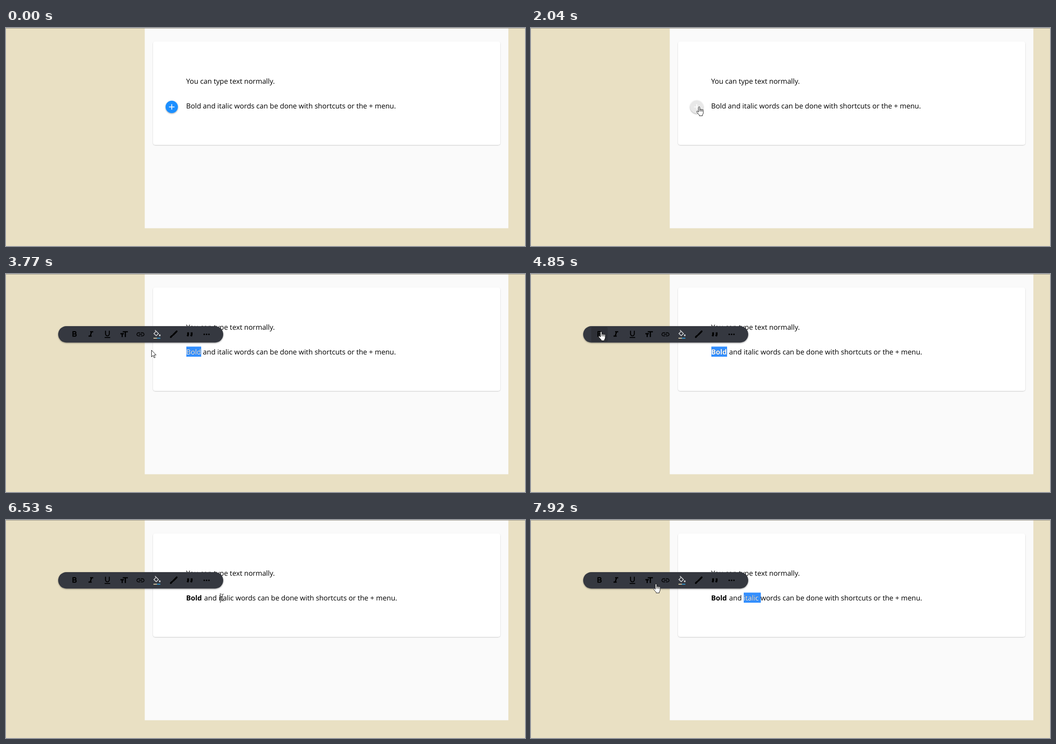
Recreate the animation shown at these times as an HTML page. Size 1154 px wide and 485 px high, loop 8000 ms.

```html
<!DOCTYPE html>
<html lang="en">
<head>
<meta charset="utf-8">
<title>Text editor demo</title>
<style>
html, body { margin: 0; width: 100%; height: 100%; overflow: hidden; background: #e9e0c3; }
svg { display: block; width: 100%; height: 100%; }
text { font-family: "Open Sans", "Noto Sans", sans-serif; font-size: 15.71px; text-rendering: geometricPrecision; }
.pointer { fill: #fff; stroke: #111; stroke-width: 1; stroke-linejoin: round; }
</style>
</head>
<body>
<svg viewBox="0 0 1154 485">
  <defs>
    <filter id="cardShade" x="-5%" y="-5%" width="110%" height="115%">
      <feDropShadow dx="0" dy="1" stdDeviation="1" flood-opacity=".2"/>
    </filter>
    <filter id="shade" x="-30%" y="-30%" width="160%" height="170%">
      <feDropShadow dx="0" dy="1.2" stdDeviation="1.6" flood-opacity=".4"/>
    </filter>
    <clipPath id="picked"><rect id="clip" y="161.5" height="22.5"/></clipPath>
  </defs>

  <rect width="1154" height="485" fill="#e9e0c3"/>
  <rect x="308.5" width="808.5" height="445.5" fill="#fafafa"/>
  <rect width="1154" height="1" fill="#989284"/>
  <rect x="327" y="30" width="772" height="230" rx="5" fill="#fff" filter="url(#cardShade)"/>

  <text x="400.5" y="124">You can type text normally.</text>
  <rect id="mark" y="161.5" height="22.5" fill="#338fff"/>
  <g id="line">
    <text id="word" x="400.5" y="179">Bold</text>
    <text id="rest" y="179">and italic words can be done with shortcuts or the + menu.</text>
  </g>
  <use href="#line" fill="#fff" clip-path="url(#picked)"/>
  <rect id="caret" x="476" y="163" width="1" height="21"/>

  <g id="plus" transform="translate(368.5 175.5)">
    <circle id="disc" r="13.7" filter="url(#shade)"/>
    <path d="M-6.1 0H6.1M0-6.1V6.1" stroke="#fff" stroke-width="1.75"/>
  </g>

  <g id="bar">
    <rect x="116" y="116" width="367" height="36.5" rx="18.2" fill="#363940" filter="url(#shade)"/>
    <rect id="press" x="134" y="118" width="36.5" height="33" rx="3" opacity=".14"/>
    <g id="icons" fill="none" stroke="#000"></g>
  </g>

  <path id="arrow" class="pointer" d="M.5.5V15.4L4 12.1 6.4 17.5 8.7 16.5 6.3 11.2H10.8Z"/>
  <g id="hand"><g class="pointer" transform="translate(-5.2 -1.3)">
    <path d="M4.5 12.5V2a1.5 1.5 0 0 1 3 0V6.8a1.4 1.4 0 0 1 2.7.3 1.3 1.3 0 0 1 2.5.6 1.3 1.3 0 0 1 2.6 1V14q0 2.6-1.9 4.4V20.6H6.4V18.8Q4.4 17 1 12.6a1.4 1.4 0 0 1 2-2Z"/>
    <path d="M7.5 6.6V11M10.2 7.2V11M12.8 8V11.2" fill="none"/>
  </g></g>
  <path id="beam" d="M-2.5-7H-.5L.5-6 1.5-7H3.5M.5-6V7M-2.5 8H-.5L.5 7 1.5 8H3.5" fill="none" stroke="#222"/>
</svg>
<script>
const LOOP = 8000;
const $ = id => document.getElementById(id);
const set = (id, attrs) => { for (const k in attrs) $(id).setAttribute(k, attrs[k]); };
const show = (id, on) => set(id, { visibility: on ? "visible" : "hidden" });
const clamp = v => Math.max(0, Math.min(1, v));
const ramp = (t, from, span) => clamp((t - from) / span);
const within = (t, a, b) => t >= a && t < b;

const stroke = (d, width, more = "") => `<path d="${d}" stroke-width="${width}" ${more}/>`;
const round = 'stroke-linecap="round"';
const pale = 'stroke="#d0d2d4"';
const icons = [
  stroke("M8.3 5.2H13a2.8 2.8 0 0 1 0 5.8H8.3M13 11h.7a2.9 2.9 0 0 1 0 5.8H8.3M8.4 4V18", 2.6),
  stroke("M10 5.5h8M6 16.5h8M13.7 5.5L10.3 16.5", 3),
  stroke("M7.2 3v8a4.8 4.8 0 0 0 9.6 0V3M5 20H19", 2.4),
  stroke("M9 5.5H22M15.5 5.5V19M3 10.5H12M7.5 10.5V19", 3),
  stroke("M11 8H7a4 4 0 0 0 0 8h4M13 8h4a4 4 0 0 1 0 8h-4M8 12h8", 1.9),
  stroke("M7 1.4L15.7 10 10 15.7 4.2 10 9.6 4.6", 1.9, pale) + stroke("M19 14v1", 4, pale + round) +
    stroke("M3 21.8H12", 2, 'stroke="#efe0b4"') + stroke("M12 21.8H20.5", 2, 'stroke="#2fa4e7"'),
  stroke("M20 4.5L11 13.5M8 16L5 19", 4.4, round),
  stroke("M7 7v6l-1.5 4M16 7v6l-1.5 4", 4.6),
  stroke("M6 12h0M12 12h0M18 12h0", 4, round)
];
$("icons").innerHTML = icons.map((shape, i) =>
  `<g transform="translate(${141.5 + 36.75 * i} 123.7) scale(.875)">${shape}</g>`).join("");

// pointer moves, each easing out to its goal
const moves = [
  { from: 70, to: 860, x: 417, y: 318 },    // enter
  { from: 860, to: 1650, x: 373, y: 176 },  // plus button
  { from: 2040, to: 2440, x: 427, y: 173 }, // end of the first word
  { from: 2600, to: 3140, x: 403, y: 174 }, // drag over it
  { from: 3290, to: 3770, x: 324, y: 169 },
  { from: 3770, to: 4390, x: 155, y: 129 }, // bold button
  { from: 5010, to: 5500, x: 400, y: 198 },
  { from: 5500, to: 5970, x: 481, y: 172 }, // double click
  { from: 7150, to: 7690, x: 372, y: 179 },
  { from: 7720, to: 7920, x: 277, y: 143 }  // toolbar
];
function pointerAt(t) {
  let x = 947, y = 474;
  for (const m of moves) {
    const k = 1 - (1 - ramp(t, m.from, m.to - m.from)) ** 1.87;
    x += (m.x - x) * k;
    y += (m.y - y) * k;
  }
  return [x, y];
}

const LETTER = 8.25;
function selection(t, x, bold) {
  if (t >= 6990) return [473, 511];
  if (!within(t, 2680, 6360)) return [0, 0];
  const steps = t < 3140 ? Math.round((x - 401) / LETTER) : 0;
  return [401 + LETTER * steps, bold ? 436 : 434];
}

const blue = [30, 143, 255], gray = [232, 232, 232];
const mix = (a, b, k) => `rgb(${a.map((v, i) => Math.round(v + (b[i] - v) * k))})`;

function draw(t) {
  const [x, y] = pointerAt(t);
  const bold = t >= 4850;

  $("word").style.fontWeight = bold ? 700 : 400;
  set("rest", { x: bold ? 440.6 : 437.8 });
  const [a, b] = selection(t, x, bold);
  for (const id of ["mark", "clip"]) set(id, { x: a, width: b - a });
  show("caret", within(t, 6360, 6990));

  const alpha = t < 6600 ? ramp(t, 3230, 180) : ramp(t, 7000, 180);
  set("bar", { opacity: alpha });
  show("press", within(t, 4770, 5170));
  show("plus", t < 3290 || within(t, 6600, 6990));
  const hover = ramp(t, 1400, 160) - ramp(t, 2100, 200);
  set("disc", { fill: mix(blue, gray, hover), r: 13.7 + .6 * hover });

  const onPlus = t < 3290 && Math.hypot(x - 368.5, y - 175.5) < 14;
  const onBar = alpha > 0 && within(x, 116, 483) && within(y, 116, 153);
  const onText = x > 400 && within(y, 160, 188);
  const kind = t < 70 ? "" : onPlus || onBar ? "hand" : onText ? "beam" : "arrow";
  for (const id of ["arrow", "hand", "beam"]) {
    show(id, id === kind);
    set(id, { transform: `translate(${Math.round(x)} ${Math.round(y)})` });
  }
}

const start = performance.now();
function tick() {
  draw((performance.now() - start) % LOOP);
  requestAnimationFrame(tick);
}
tick();
</script>
</body>
</html>
```
